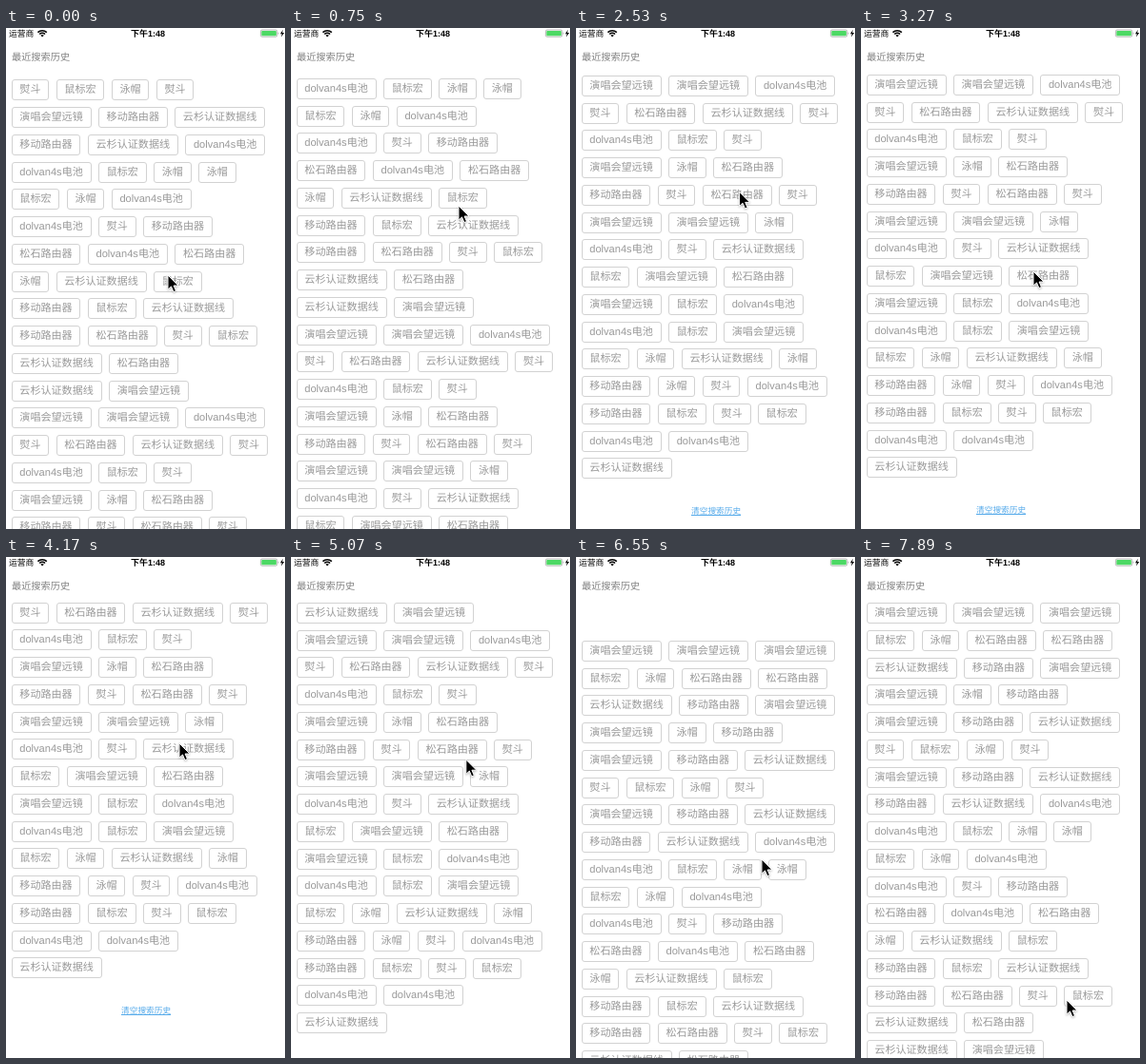
Recreate the animation shown at these times as an HTML page. Size 293x527 px, loop 8000 ms.

```html
<!DOCTYPE html>
<html lang="zh-CN">
<head>
<meta charset="utf-8">
<style>
html, body { margin: 0; width: 100%; height: 100%; overflow: hidden; background: #fff; }
body {
  position: relative; white-space: nowrap; text-rendering: geometricPrecision;
  font-family: "Liberation Sans", "Noto Sans CJK SC", "Noto Sans CJK", sans-serif;
}
.label { position: absolute; line-height: 12px; color: #000; font-size: 8.8px; }
#time { left: 0; width: 298px; top: 0; text-align: center; font-size: 9px; font-weight: bold; }
#title { left: 6px; top: 26px; font-size: 10.2px; color: #808080; }
#view { position: absolute; left: 0; top: 48px; width: 293px; height: 479px; overflow: hidden; }
#list { position: absolute; left: 5.5px; top: 0; }
.row { display: flex; height: 28.75px; }
.tag {
  box-sizing: border-box; flex: none; height: 22px; margin-right: 7.25px; padding: 0 7.8px;
  border: 1px solid #d2d2d2; border-radius: 3px; font-size: 11.08px; line-height: 20px; color: #999;
}
#clear {
  position: absolute; left: 115.5px; top: 940.5px; font-size: 8.7px; line-height: 12px;
  color: #55aaea; text-decoration: underline;
}
svg { position: absolute; left: 0; top: 0; overflow: visible; }
#cursor { filter: drop-shadow(0 1px 1px #0004); }
</style>
</head>
<body>
<div class="label" style="left:3px;top:0">运营商</div>
<div class="label" id="time">下午1:48</div>
<svg width="293" height="12">
  <path d="M33.4 4.6A6.6 6.6 0 0 1 42.8 4.6M35.2 6.5A4 4 0 0 1 41 6.5"
    fill="none" stroke="#000" stroke-width="1.5"/>
  <path d="M38.1 9.6L36.4 7.8A2.4 2.4 0 0 1 39.8 7.8Z"/>
  <rect x="267.4" y="2" width="17.4" height="7.2" rx="1.6" fill="#fff" stroke="#888" stroke-width=".6"/>
  <rect x="268.3" y="2.9" width="15.6" height="5.4" rx=".8" fill="#4cd964"/>
  <path d="M285.7 4.2Q287.2 5.6 285.7 7Z" fill="#888"/>
  <path d="M290.8 1.8L288 6.2H289.8L289 9.6L292.2 5H290.2Z"/>
</svg>
<div class="label" id="title">最近搜索历史</div>
<div id="view"><div id="list"></div></div>
<svg id="cursor" width="12" height="19">
  <path d="M0 0V15.2L3.5 11.9L5.9 17.6L8.5 16.5L6.1 11H11Z" stroke="#fff" stroke-width="1"/>
</svg>
<script>
const words = ['演唱会望远镜', '鼠标宏', '泳帽', '松石路由器', '云杉认证数据线',
  '移动路由器', '熨斗', 'dolvan4s电池'];
// Each digit picks a word, each group is one row.
const rows = ('000 1233 450 025 054 6126 054 547 7122 127 765 373 241 514 5361 43 40 ' +
  '007 6346 716 023 5636 002 764 103 017 710 1242 5267 5161 77 4').split(' ');
const list = document.getElementById('list');
const cursor = document.getElementById('cursor');
const tag = d => `<span class="tag">${words[d]}</span>`;
list.innerHTML = rows.map(r => `<div class="row">${[...r].map(tag).join('')}</div>`).join('') +
  '<div id="clear">清空搜索历史</div>';

const LOOP = 8000, STEP = 148.87;
const TOP = 0, BOTTOM = 481.5;

const drag = f => f;
const glide = f => 1 - (1 - f) ** 2;
const settle = f => f * f * (3 - 2 * f);
const fling = f => f < .5 ? 4 * f ** 3 : 1 - 4 * (1 - f) ** 3;

// Each move: end time, easing, value reached.
const scrollMoves = [
  [0, drag, 137.3], [744, drag, 225], [1490, glide, 305], [1935, drag, 377],
  [2820, glide, 500], [3570, settle, BOTTOM], [3720, drag, BOTTOM],
  [4170, glide, 518], [4750, settle, BOTTOM],
  [6230, fling, -94], [7150, glide, TOP]
];
// Each move: end time, easing, x, y.
const cursorMoves = [
  [0, drag, 170, 260], [744, settle, 176, 187], [1490, settle, 172, 250],
  [1935, settle, 170, 167], [2400, drag, 171, 167], [3275, settle, 181, 256],
  [3720, drag, 181, 256], [4170, settle, 182, 196], [4750, drag, 182, 196],
  [5700, fling, 195, 318], [7590, drag, 195, 318], [7890, drag, 216, 466]
];

function at(moves, t) {
  const i = moves.findIndex(m => m[0] > t);
  if (i < 0) return moves[moves.length - 1].slice(2);
  const [start, , ...from] = moves[i - 1];
  const [end, ease, ...to] = moves[i];
  const f = ease((t - start) / (end - start));
  return from.map((v, k) => v + (to[k] - v) * f);
}

function draw() {
  const t = Math.floor((performance.now() % LOOP + 6) / STEP) * STEP;
  const [x, y] = at(cursorMoves, t);
  list.style.top = -at(scrollMoves, t)[0] + 'px';
  cursor.style.transform = `translate(${x}px, ${y}px)`;
  requestAnimationFrame(draw);
}
draw();
</script>
</body>
</html>
```
